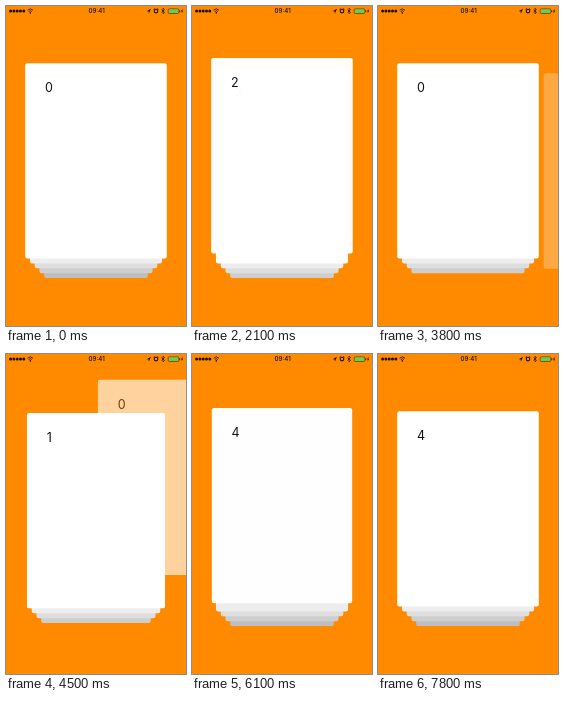
Animation, 180 px wide and 320 px high, one loop 8000 ms. Source, as an HTML page:

```html
<!DOCTYPE html>
<html lang="en">
<head>
<meta charset="utf-8">
<title>Card stack</title>
<style>
  html, body { margin: 0; width: 100%; height: 100%; overflow: hidden; background: #ff8a00; }
  svg { display: block; width: 100%; height: 100%; }
  text { font-family: Inter, Roboto, sans-serif; fill: #111; }
  .num { font-size: 12.5px; }
  .clock { font-size: 6.2px; font-weight: 500; text-anchor: middle; }
  .line { fill: none; stroke: #1a1000; stroke-width: .8; }
</style>
</head>
<body>
<svg viewBox="0 0 180 320">
  <rect width="180" height="320" fill="#ff8a00"/>
  <g id="stack"></g>
  <g id="status" fill="#1a1000">
    <path d="M4.6 5h14" fill="none" stroke="#1a1000" stroke-width="3" stroke-linecap="round" stroke-dasharray="0 3.3"/>
    <path class="line" d="M21.6 4.2a3.8 3.8 0 0 1 5.4 0M22.7 5.5a2.3 2.3 0 0 1 3.2 0"/>
    <circle cx="24.3" cy="6.9" r=".8"/>
    <text class="clock" x="90.7" y="7.2">09:41</text>
    <path d="M140.6 5.2l4.4-2.5-2.1 4.8-.4-2.2z"/>
    <circle class="line" cx="150" cy="5.1" r="1.8" style="stroke-width:1.1"/>
    <path class="line" d="M147.5 3.4l1.2-1M152.5 3.4l-1.2-1M155.5 3.6l3 2.8-1.5 1.4v-5.6l1.5 1.4-3 2.8" style="stroke-width:.7"/>
    <rect x="162.2" y="2.9" width="10.6" height="4.6" rx="1" fill="none" stroke="#3a2a00" stroke-width=".6"/>
    <rect x="162.9" y="3.6" width="9.2" height="3.2" rx=".4" fill="#4cd964"/>
    <rect x="173.4" y="4.3" width=".8" height="1.8"/>
    <path d="M176.6 2.6l-1.6 2.8h1l-.4 2.2 1.6-2.9h-1z"/>
  </g>
</svg>
<script>
const LOOP = 8000, COUNT = 5;
const GREYS = ['#fff', '#ededed', '#dedede', '#cecece', '#bebebe'];

// Swipes carry the full travel of the leaving card; rewinds bring the last one back.
const swipe = (at, end, dx, dy) => ({ at, end, dx, dy, step: 1 });
const rewind = (at, end) => ({ at, end, step: -1 });
const moves = [
  swipe(620, 1450, -3, -265),
  swipe(1470, 1950, -2, -265),
  swipe(2070, 2650, -3, -265),
  swipe(2765, 3300, 185, 8),
  swipe(3420, 4250, 185, 12.8),
  swipe(4270, 5100, 185, -80),
  rewind(5150, 5500),
  rewind(5650, 6300),
  rewind(6450, 6950),
  swipe(7170, 7800, 185, 8)
];

const clamp = v => Math.min(1, Math.max(0, v));
const span = (v, a, b) => clamp((v - a) / (b - a));
const smooth = v => v * v * (3 - 2 * v);
const easeOut = (v, k) => 1 - Math.pow(1 - v, k);

const NS = 'http://www.w3.org/2000/svg';
const add = (name, parent) => parent.appendChild(document.createElementNS(NS, name));
const stack = document.getElementById('stack');
const cards = [];
for (let depth = COUNT - 1; depth >= 0; depth--) {
  const group = add('g', stack), box = add('rect', group), label = add('text', group);
  box.setAttribute('height', 195.3);
  box.setAttribute('rx', 2.2);
  label.setAttribute('class', 'num');
  label.setAttribute('x', 19.8);
  label.setAttribute('y', 29.2);
  cards[depth] = { group, box, label };
}

function place(depth, number, slot, shade, dx = 0, dy = 0, x0 = 19.2 + 4.75 * slot, y0 = 57.2 + 4.9 * slot) {
  const { group, box, label } = cards[depth];
  group.setAttribute('transform', `translate(${x0 + dx} ${y0 + dy})`);
  group.setAttribute('opacity', clamp(1 - Math.hypot(dx / 200, dy / 280)));
  box.setAttribute('width', 141.6 - 9.5 * slot);
  box.setAttribute('fill', GREYS[shade]);
  label.textContent = (number + COUNT) % COUNT;
}

function drawSwipe(top, move, u) {
  if (u < .65) {
    const p = smooth(u / .65), rise = smooth(span(u, .08, .42));
    place(0, top, 0, 0, move.dx * p, move.dy * p);
    for (let d = 1; d < COUNT; d++) place(d, top + d, d - rise, d - 1);
  } else {
    drawRest(top + 1);
    place(4, top, 3 + smooth(span(u, .65, .74)), 4);
  }
}

function drawRewind(top, u) {
  const sink = easeOut(span(u, 0, .2), 2);
  const slot = 1 - easeOut(span(u, .286, 1), 2.4);
  place(0, top - 1, slot, 0, 0, -255 * Math.pow(1 - u, 3.7), undefined, 57.2);
  for (let d = 1; d < COUNT; d++) place(d, top - 1 + d, d - 1 + sink, d);
}

function drawRest(top) {
  for (let d = 0; d < COUNT; d++) place(d, top + d, d, d);
}

function draw(t) {
  let top = 0;
  for (const move of moves) {
    if (t < move.at) break;
    if (t < move.end) {
      const u = span(t, move.at, move.end);
      return move.step > 0 ? drawSwipe(top, move, u) : drawRewind(top, u);
    }
    top += move.step;
  }
  drawRest(top);
}

const start = performance.now();
function tick() {
  draw((performance.now() - start) % LOOP);
  requestAnimationFrame(tick);
}
tick();
</script>
</body>
</html>
```
